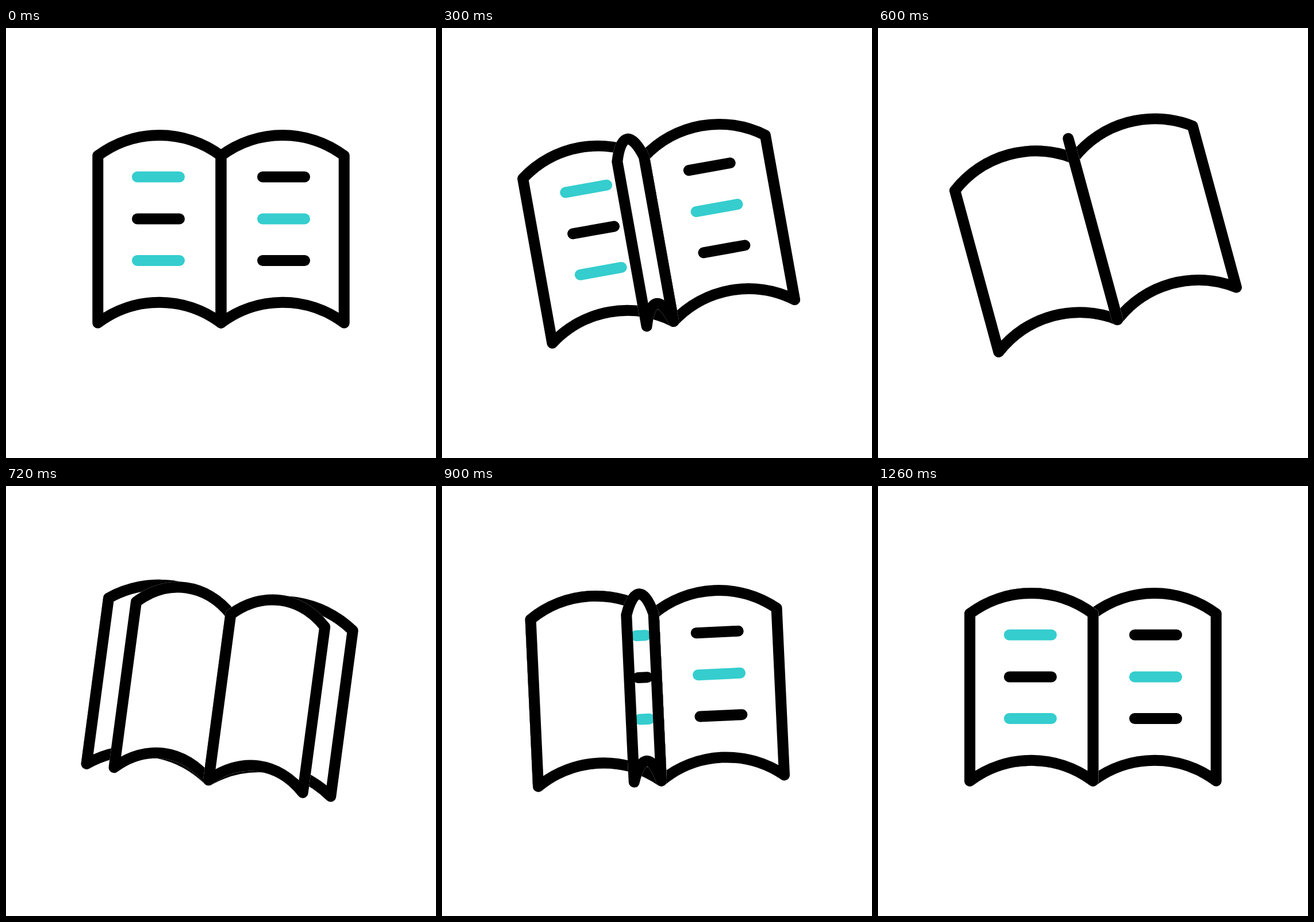
These frames come from a looping animation (748 px wide and 748 px high, 1.32 s). An HTML page without scripts:

```html
<!DOCTYPE html>
<html lang="en">
<head>
<meta charset="utf-8">
<title>Book turning its pages</title>
<style>
  @property --tick { syntax: "<integer>"; inherits: true; initial-value: 0; }
  @property --f { syntax: "<integer>"; inherits: true; initial-value: 0; }

  html, body { margin: 0; width: 100%; height: 100%; overflow: hidden; background: #fff; }

  svg {
    display: block;
    width: 100%;
    height: 100%;
    fill: none;
    stroke: #000;
    stroke-width: 19;
    stroke-linecap: round;
    stroke-linejoin: round;
    animation: clock 1320ms steps(44) infinite;
  }
  @keyframes clock { from { --tick: 0; } to { --tick: 44; } }

  /* Five drawings for every six 30 ms ticks; the integer type does the rounding. */
  .book { --f: calc(var(--tick) * 5 / 6 - .4); }

  path { vector-effect: non-scaling-stroke; }
  .teal { stroke: #35cdce; }
  .paper { fill: #fff; stroke: #fff; }

  /* Each swing adds its own eased turn to the book. */
  .swing {
    --x: clamp(0, (var(--f) - var(--at)) / var(--span), 1);
    transform: rotate(calc(var(--turn) * (.335 + .33 * var(--x) - .335 * cos(180deg * var(--x)))));
  }

  /* A page is upright at --mid and lies flat seven drawings before and after.
     The small offset keeps its width from reaching zero. */
  .page {
    --s: calc(-1 * sin(clamp(-90deg, (var(--f) - var(--mid) + .01) * 12.65deg, 90deg)));
    transform: scaleX(var(--s));
    opacity: clamp(0, var(--f) - var(--mid) + 7, 1);
  }
  .front { opacity: clamp(0, var(--s) * 999, 1); }
  .back { opacity: clamp(0, var(--s) * -999, 1); }

  /* The lowest right page is blank while the second page turns. */
  .base { opacity: calc(clamp(0, 10 - var(--f), 1) + clamp(0, var(--f) - 17, 1)); }
</style>
</head>
<body>
<svg viewBox="0 0 748 748">
  <defs>
    <path id="leaf" d="M0 -127.8A179 179 0 0 1 107.1 -163.5A179 179 0 0 1 214.2 -127.8V163A179 179 0 0 0 107.1 127.2A179 179 0 0 0 0 163Z"/>
    <path id="outer" d="M72.5 -91h73M72.5 54.5h73"/>
    <path id="inner" d="M72.5 -18h73"/>
    <g id="right-text"><use href="#outer"/><use href="#inner" class="teal"/></g>
    <g id="left-text"><use href="#outer" class="teal"/><use href="#inner"/></g>
  </defs>

  <g class="book" transform="translate(374 350)">
    <g class="swing" style="--at:0; --span:15; --turn:-18.6deg">
    <g class="swing" style="--at:15; --span:5; --turn:26.2deg">
    <g class="swing" style="--at:20; --span:5; --turn:-10.25deg">
    <g class="swing" style="--at:25; --span:5; --turn:5.65deg">
    <g class="swing" style="--at:30; --span:5; --turn:-3deg">

      <g transform="scale(-1 1)"><use href="#left-text"/><use href="#leaf"/></g>
      <use href="#right-text" class="base"/>
      <use href="#leaf"/>

      <g class="page" style="--mid:7">
        <use href="#leaf" class="paper"/>
        <use href="#right-text" class="front"/>
        <use href="#leaf"/>
      </g>
      <g class="page" style="--mid:16">
        <use href="#leaf" class="paper"/>
        <use href="#right-text" class="front"/>
        <use href="#leaf"/>
      </g>
      <g class="page" style="--mid:24">
        <use href="#leaf" class="paper"/>
        <use href="#left-text" class="back"/>
        <use href="#leaf"/>
      </g>

    </g></g></g></g></g>
  </g>
</svg>
</body>
</html>
```
